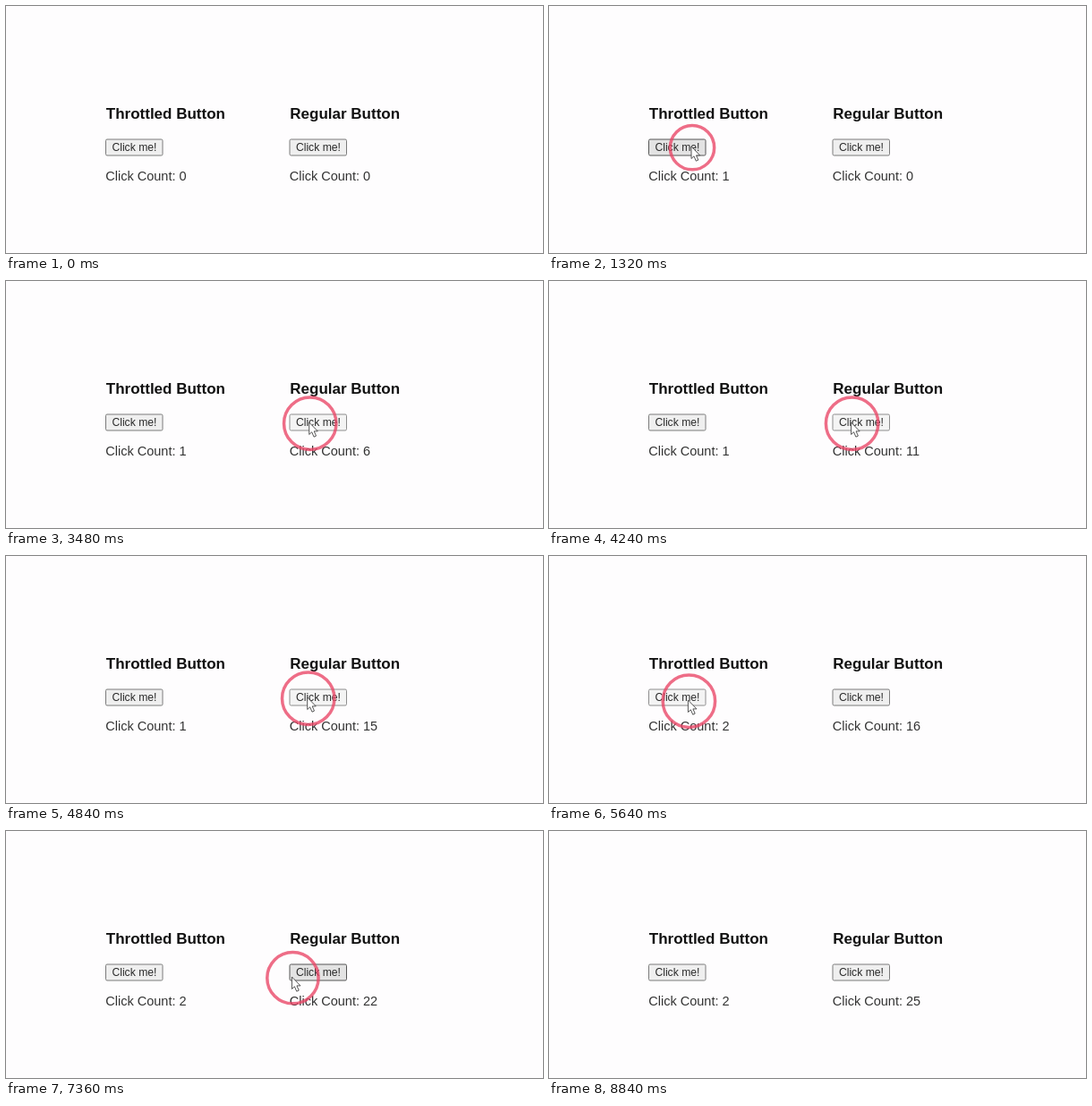
These frames come from a looping animation (600 px wide and 276 px high, 9400 ms). An HTML page:

```html
<!DOCTYPE html>
<html lang="en">
<head>
<meta charset="utf-8">
<style>
  html, body { margin: 0; width: 100%; height: 100%; overflow: hidden; background: #fefdfe; }
  svg { display: block; width: 600px; height: 276px; font-family: "Liberation Sans", Arial, sans-serif; }
  .title { font-size: 17px; font-weight: bold; fill: #111; }
  .label { font-size: 12.2px; fill: #2a2a2a; }
  .count { font-size: 14.5px; fill: #333; }
</style>
</head>
<body>
<svg viewBox="0 0 600 276">
  <g id="panels"></g>
  <circle id="ring" fill="none" stroke="#ea4666" stroke-width="3.5" opacity=".78"/>
  <path id="cursor" d="M0 0V13.5L3 10.8L5.3 16.2L7.8 15.1L5.5 9.9H9.6Z"
        fill="#fff" stroke="#444" stroke-width=".9"/>
</svg>
<script>
const LOOP = 9400, STEP = 40, SHOW = 400, HIDE = 8840;
const LEFT = 111.5, SHIFT = 205.5, WIDTH = 63.5;
const RING_MS = 131, LEAD = 120, GLIDE = 150, DRIFT = -0.0015;

// Places where the cursor rests; n clicks, one every gap ms from start
const stops = [
  { x: 196, y: 120, start: SHOW, gap: 0, n: 0 },
  { x: 160, y: 157, start: 661, gap: 151, n: 11 },
  { x: 340, y: 158, start: 2635, gap: 151, n: 16 },
  { x: 156, y: 161, start: 5240, gap: 151, n: 5 },
  { x: 321, y: 163, start: 6318, gap: 193, n: 9 },
  { x: 418, y: 20, start: HIDE + LEAD, gap: 0, n: 0 }
];

const $ = id => document.getElementById(id);
const ring = $("ring"), cursor = $("cursor");

$("panels").innerHTML = ["Throttled", "Regular"].map((name, i) => `
  <g transform="translate(${i * SHIFT})">
    <text class="title" x="111.8" y="126">${name} Button</text>
    <rect x="${LEFT}" y="149" width="${WIDTH}" height="18" rx="1.5"/>
    <text class="label" x="118.4" y="162">Click me!</text>
    <text class="count" x="111.3" y="194.6"></text>
  </g>`).join("");
const buttons = document.querySelectorAll("rect");
const counts = document.querySelectorAll(".count");

// Rest with a slow drift, then glide to the next stop just in time
function position(t) {
  const i = stops.findIndex(s => s.start - LEAD > t);
  const from = stops[i - 1], to = stops[i];
  const arrive = to.start - LEAD;
  const k = Math.max(0, 1 - (arrive - t) / GLIDE);
  const x = from.x + DRIFT * Math.max(0, t - from.start);
  return { x: x + (to.x - x) * k, y: from.y + (to.y - from.y) * k };
}

function draw(t) {
  const total = [0, 0];
  let phase = Infinity;
  for (const { x, start, gap, n } of stops) {
    if (!n || t < start) continue;
    const done = Math.min(n, Math.floor((t - start) / gap) + 1);
    const regular = x > 300;
    total[+regular] += regular ? done : 1;   // throttling keeps one click per burst
    phase = t - start - (done - 1) * gap;
  }

  const pos = t >= SHOW && t < HIDE && position(t);
  const ringOn = pos && phase < RING_MS;
  cursor.style.display = pos ? "" : "none";
  ring.style.display = ringOn ? "" : "none";
  if (pos) {
    cursor.setAttribute("transform", `translate(${pos.x} ${pos.y})`);
    ring.setAttribute("cx", pos.x + 1);
    ring.setAttribute("cy", pos.y + 1.2);
    ring.setAttribute("r", 14.6 * (1 + Math.min(1, phase / 80)));
  }

  buttons.forEach((b, i) => {
    const dx = pos ? pos.x - LEFT - i * SHIFT : -1;
    const hover = dx >= 0 && dx <= WIDTH && pos.y >= 149 && pos.y <= 167;
    const active = hover && ringOn && phase >= 85;
    b.setAttribute("fill", active ? "#f4f4f4" : hover ? "#e3e3e3" : "#efefef");
    b.setAttribute("stroke", active ? "#8d8d8d" : hover ? "#555" : "#7a7a7a");
    counts[i].textContent = "Click Count: " + total[i];
  });
}

const begin = performance.now();
function tick() {
  const t = (performance.now() - begin) % LOOP;
  draw(Math.floor(t / STEP) * STEP);
  requestAnimationFrame(tick);
}
tick();
</script>
</body>
</html>
```
